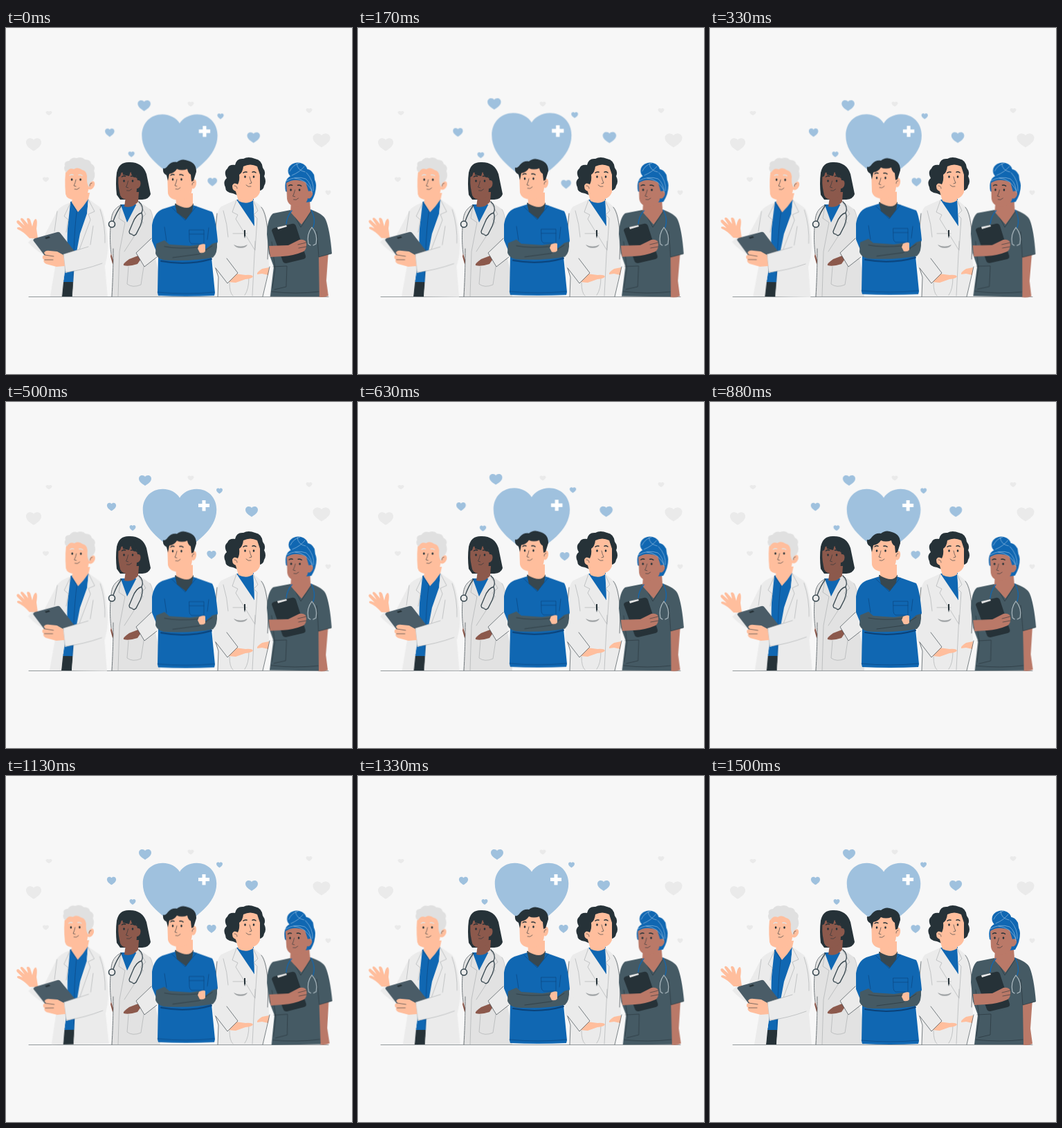
Recreate the animation shown at these times as an HTML page without scripts. Size 500x500 px, loop 1540 ms.

```html
<!DOCTYPE html>
<html lang="en">
<head>
<meta charset="utf-8">
<title>Medical team</title>
<style>
  html, body { margin: 0; width: 100%; height: 100%; overflow: hidden; background: #f7f7f7; }
  svg { display: block; width: 100vw; height: 100vh; }
  .beat, .sway, .float { animation: 1.54s linear -40ms infinite; }
  .beat { animation-name: beat; transform-origin: 252px 161px; fill: #9fc1de; }
  .sway { animation-name: sway; }
  .float { animation-name: float; }
  .left { transform-origin: 81px 288px; }
  .right { transform-origin: 424px 291px; }
  @keyframes beat {
    0%, 30%, 40%, 60%, 100% { transform: scale(1); }
    10%, 50% { transform: scale(1.1); }
  }
  @keyframes sway {
    0%, 100% { transform: rotate(0); }
    25% { transform: rotate(1deg); }
    75% { transform: rotate(-1deg); }
  }
  @keyframes float {
    0%, 100% { transform: translateY(0); }
    50% { transform: translateY(-5px); }
  }
  .coat { fill: #ebebeb; }
  .shade { fill: #e2e2e2; }
  .blue { fill: #1067b2; }
  .dark { fill: #263238; }
  .slate { fill: #455a64; }
  .peach { fill: #ffbe9d; }
  .brown { fill: #8c594c; }
  .tan { fill: #ba7968; }
  .line { fill: none; stroke: #263238; stroke-width: .6; stroke-linecap: round; stroke-linejoin: round; }
  .soft { stroke: #a5a8aa; }
  .navy { stroke: #0b4177; }
  .tube { fill: none; stroke: #37474f; stroke-width: 1.3; stroke-linecap: round; }
</style>
</head>
<body>
<svg viewBox="0 0 500 500">
  <defs>
    <path id="heart" d="M0 44C-20 30-50 12-50-16C-50-33-38-44-23-44C-13-44-4-39 0-32C4-39 13-44 23-44C38-44 50-33 50-16C50 12 20 30 0 44Z"/>
    <g id="face">
      <g class="dark"><ellipse cx="-6" cy="0" rx="1.3" ry="1.8"/><ellipse cx="6.5" cy="0" rx="1.3" ry="1.8"/></g>
      <path d="M-9-6q3-2 5-.7M4-6.7q3-1 5 1" fill="none" stroke="currentColor" stroke-width="1.5" stroke-linecap="round"/>
      <path class="line" d="M0 0q-1 5-3 9l3 .8M-2 14q4 1.5 7-2"/>
    </g>
  </defs>

  <g fill="#eaeaea">
    <use href="#heart" transform="translate(62 123) scale(.09 .07)"/>
    <use href="#heart" transform="translate(40 168.500) scale(.22 .21)"/>
    <use href="#heart" transform="translate(57.500 219) scale(.09 .08)"/>
    <use href="#heart" transform="translate(267 110) scale(.09 .08)"/>
    <use href="#heart" transform="translate(438 119.500) scale(.09 .08)"/>
    <use href="#heart" transform="translate(456 162.500) scale(.25 .23)"/>
    <use href="#heart" transform="translate(465.500 238) scale(.08)"/>
  </g>

  <g class="beat">
    <use href="#heart" transform="translate(251 172.500) scale(1.065)"/>
    <use href="#heart" transform="translate(201 113.500) scale(.18 .17)"/>
    <use href="#heart" transform="translate(152.500 151.500) scale(.132)"/>
    <use href="#heart" transform="translate(183 182) scale(.09)"/>
    <use href="#heart" transform="translate(308.500 128.500) scale(.09)"/>
    <use href="#heart" transform="translate(355 158.500) scale(.18 .17)"/>
    <use href="#heart" transform="translate(297 221) scale(.134)"/>
    <path fill="#fff" d="M283.500 142h5v5h5.500v5h-5.500v5.500h-5v-5.500h-5.500v-5h5.500z"/>
  </g>

  <path class="line" d="M33 388.300H466"/>

  <!-- Senior doctor -->
  <g class="sway left">
    <path class="dark" d="M82 364h16l-2 24H81z"/>
    <path class="blue" d="M93 251L119 246L117 270L101 335L98 367H83L89 325L88 285Z"/>
    <path class="line navy" d="M103 260Q98 290 97 366M94 253l7 10 15-12"/>
    <path class="coat" d="M93 252Q79 257 74 264L54 303L38 304L32 310Q45 324 58 329L75 321L72 340L64 388H81L86 340L89 290Z"/>
    <path class="coat" d="M119 247L136 259Q143 266 147 306Q149 322 143 344L147 388H96L99 340L107 297L117 268Z"/>
    <path class="line soft" d="M93 253l-9 19 6 5-3 18M119 248l9 17-9 4 3 8-20 54M136 262q8 23 7 51l-30 14M126 286l-4 27M74 265l-4 29"/>
    <path class="peach" d="M46 304L34 304Q25 294 17 291Q14 288 19 288L24 290L16 282Q14 278 18 278L27 286L21 277Q21 273 25 276L32 284L30 276Q32 273 35 277L38 287Q40 276 43 276Q46 277 44 290Z"/>
    <path fill="#4a5c67" d="M40 308Q38 306 42 304L74 295Q77 294 79 297L101 325Q102 328 98 328L62 332Q58 332 56 329Z"/>
    <path class="dark" d="M56 303l6-2 2 2-6 2z"/>
    <path class="coat" d="M146 310Q149 323 139 340L86 354L83 327L121 315Z"/>
    <path class="line soft" d="M119 316l-36 11 3 26M139 340q-27 10-53 13"/>
    <path class="peach" d="M83 328L85 344L73 345L58 341Q53 338 55 335L53 333Q52 328 57 328L55 325Q57 321 63 322L74 323Z"/>
    <path class="line" d="M56 328l13 2M56 335l12 0"/>
    <path class="peach" d="M97 238H121L119 247Q112 258 104 266L95 252Z"/>
    <path class="peach" d="M87 202Q103 194 121 204L122 222Q129 219 128 227Q125 235 119 233Q118 247 102 248Q88 249 86 240Q84 217 87 202Z"/>
    <path fill="#e0e0e0" d="M87 209Q82 204 85 199Q83 193 91 192Q95 186 102 188Q109 185 114 190Q122 190 123 196Q130 200 127 206Q130 214 126 220L121 224L120 230Q116 225 117 214Q116 206 110 205Q103 200 98 204Q91 201 87 209Z"/>
    <use href="#face" x="101" y="219" color="#e0e0e0"/>
    <path class="line" d="M124 224q-3 0-3 4"/>
  </g>

  <!-- Doctor with stethoscope -->
  <g>
    <path class="brown" d="M154 316L151 330L154 341L161 335V316Z"/>
    <path class="blue" d="M165 255H191L186 284L170 280Z"/>
    <path class="shade" d="M166 256Q154 263 152 275Q148 302 152 326L155 336L152 388H223Q223 360 216 333L213 294Q212 266 207 261L191 250L175 281Z"/>
    <path class="line" d="M166 256q-13 6-14 22-3 25 0 48M155 319q0 35-2 69" stroke-dasharray="6 1"/>
    <path class="line soft" d="M166 257l-3 18 9 6-8 42-2 65M191 251l11 18-8 7 4 5-27 42M208 262q6 7 6 45M177 345l-2 25q8 6 20 1l4-26"/>
    <path class="brown" d="M199 328L190 341Q178 345 170 343Q168 341 178 334L191 329Z"/>
    <path class="coat" d="M213 303L217 331L200 345L188 325L203 310Z"/>
    <path class="line" d="M210 304l-22 21 12 20 18-14"/>
    <path class="tube" d="M167 256Q160 265 155 279"/>
    <circle cx="153" cy="283.500" r="4.500" fill="#ebebeb" stroke="#37474f" stroke-width="1.600"/>
    <path class="tube" d="M192 251Q200 258 196 267Q188 269 183 282L178 294Q178 298 182 298M196 267Q199 274 194 286L188 298Q185 301 183 299"/>
    <path class="dark" d="M160 241Q158 224 160 209Q163 194 177 194Q197 193 203 211L209 240Q207 247 197 248L165 248Z"/>
    <path class="brown" d="M174 237H192L191 251Q183 261 171 258Z"/>
    <path class="brown" d="M163 209L187 208L190 220Q196 219 194 228Q192 232 189 232Q189 247 175 248Q165 248 164 237Q161 224 163 209Z"/>
    <path class="dark" d="M161 216Q165 196 180 198Q188 200 189 217L182 213L180 207L178 214L169 212L168 205L165 214Z"/>
    <use href="#face" x="176.500" y="221" color="#263238"/>
  </g>

  <!-- Doctor with curly hair -->
  <g>
    <path class="blue" d="M333 248L358 247L359 288L343 274Z"/>
    <path class="coat" d="M333 248L311 258Q304 264 303 290L299 342L307 359L306 388H371L380 346L378 280Q376 264 369 258L357 248L360 288Z"/>
    <path class="line soft" d="M333 249l-6 17 8 4-3 6 27 44M357 249l7 15-6 6 5 5-3 46M314 264q6 20 7 38M328 297h20M360 308l-4 79M323 368q0 15 5 19M351 360q0 18-6 26"/>
    <path class="line" d="M305 268q-3 28-3 40M301 341l6 19-1 28M369 259q8 9 10 47l-1 28"/>
    <path fill="#a5a8aa" d="M329 313q10 5 20 0-2 5-10 5-7 0-10-5z"/>
    <path class="dark" d="M344 292h2v8l-1 4-1-4z"/>
    <path class="peach" d="M331 355L346 357Q355 356 357 359Q356 362 346 363L332 368L321 367L320 360Z"/>
    <path class="peach" d="M380 346L370 348Q362 353 363 356L370 355L379 357Z"/>
    <path class="coat" d="M302 302L299 342L320 369L335 354L318 332Z"/>
    <path class="line" d="M319 333l16 21-15 15-17-22M381 345q-5 22-10 43"/>
    <path class="dark" d="M328 239Q317 238 317 230Q313 222 319 217Q314 208 320 203Q322 197 331 198Q333 188 343 189Q350 185 360 189Q370 191 371 202Q376 208 373 214Q377 222 373 228Q372 236 363 235L340 244Z"/>
    <path class="peach" d="M331 233H357V249Q348 256 336 250Z"/>
    <path class="peach" d="M337 212Q342 209 343 200Q353 195 363 200L367 212L367 237Q363 248 349 248Q337 248 334 236Q327 236 327 228Q329 222 335 226Q338 220 337 212Z"/>
    <use href="#face" transform="translate(352 215) scale(-1 1)" color="#263238"/>
    <path class="line" d="M330 228q4 0 4 4"/>
  </g>

  <!-- Nurse with turban -->
  <g class="sway right">
    <path class="tan" d="M449 323L466 322L463 365L466 387Q456 391 449 387Z"/>
    <path class="slate" d="M411 263L386 268Q378 274 377 298L380 326L387 345L382 388H453L452 331L471 326Q468 291 462 277Q458 268 439 262Z"/>
    <path class="line" d="M384 309l5 39-4 28M449 294q2 20 3 37l18-5M386 345l20-1-1 30-17 4M384 381q35 4 68 0M414 266l12 22 15-23"/>
    <path class="tan" d="M412 250H439L440 265Q433 276 427 284L411 266Z"/>
    <path class="tube" d="M413 264Q406 272 405 283M441 263Q448 276 444 288" style="stroke:#1067b2"/>
    <path class="tube" d="M442 288Q434 298 437 312L440 314M442 288Q451 298 448 312L444 314" style="stroke:#b9c6cc;stroke-width:1.100"/>
    <path class="dark" d="M384 293Q384 290 388 289L413 283Q417 282 419 286L433 329Q434 333 430 334L405 340Q401 340 400 337Z"/>
    <path fill="#ebebeb" d="M392 288l13-3 1 2-13 4z"/>
    <path class="tan" d="M380 315L408 314L424 306Q432 305 434 310Q435 320 430 323Q416 329 400 330L382 331Z"/>
    <path class="line" d="M434 310l-12 3M434 316l-11 2"/>
    <path class="blue" d="M404 236Q401 219 411 214H436Q447 215 448 227Q448 240 441 251L433 252Z"/>
    <path class="tan" d="M405 224Q417 216 433 223L437 236Q444 233 443 241Q440 248 436 246Q434 257 421 258Q408 258 406 247Z"/>
    <ellipse class="blue" cx="421.500" cy="206.500" rx="14" ry="12"/>
    <path class="blue" d="M430 204Q440 202 445 212L447 226L436 222L427 214Z"/>
    <path class="line" d="M405 221q14-8 28-3 8 6 9 20M417 217q16 1 25 18M410 207q4-9 14-12M413 213q12-5 18-13M420 196q1 10 12 12M434 209q11 12 10 26" style="stroke:#a9cbe8"/>
    <use href="#face" x="417.500" y="234" color="#263238"/>
    <circle cx="441" cy="247" r="1.200" class="blue"/>
  </g>

  <!-- Surgeon with crossed arms -->
  <g class="float">
    <path class="blue" d="M245 256L226 262Q214 267 211 285L211 308L220 330L219 383L220 387Q260 389 301 387L302 383L297 332L306 309Q303 275 298 266L270 256Z"/>
    <path class="line navy" d="M219 382q41 4 82 0M265 292h21v20h-18q-3-2-3-5zM265 298h21M229 288l3 20M293 289l-2 17M240 260l19 18 16-20"/>
    <path class="line navy" d="M224 337q38 7 73-3" style="stroke-width:2"/>
    <path fill="#37474f" d="M244 254L271 254L269 265L260 277L247 267Z"/>
    <path class="slate" d="M217 312L229 307L236 313L266 315L280 313L281 326L298 312L305 310Q306 326 299 332Q275 337 235 336Q219 336 216 326Z"/>
    <path class="line" d="M229 316q20 4 50 1M298 315l-19 12-38 5"/>
    <path class="peach" d="M279 314Q285 311 288 313L288 323Q286 326 280 325L277 319Z"/>
    <path class="peach" d="M245 239H270V255Q264 265 246 255Z"/>
    <path class="peach" d="M233 208Q248 198 268 206L269 219Q276 217 275 226Q273 234 269 232Q268 248 251 249Q236 249 234 239Z"/>
    <path class="dark" d="M234 221L232 213Q226 210 227 203Q231 204 234 199Q239 193 247 194Q254 188 263 192Q275 195 275 208L271 221L268 222L267 212Q263 210 262 204Q254 207 247 204Q243 210 236 211Z"/>
    <use href="#face" x="247" y="219" color="#263238"/>
    <path class="line" d="M272 223q-3 0-3 4"/>
  </g>
</svg>
</body>
</html>
```
